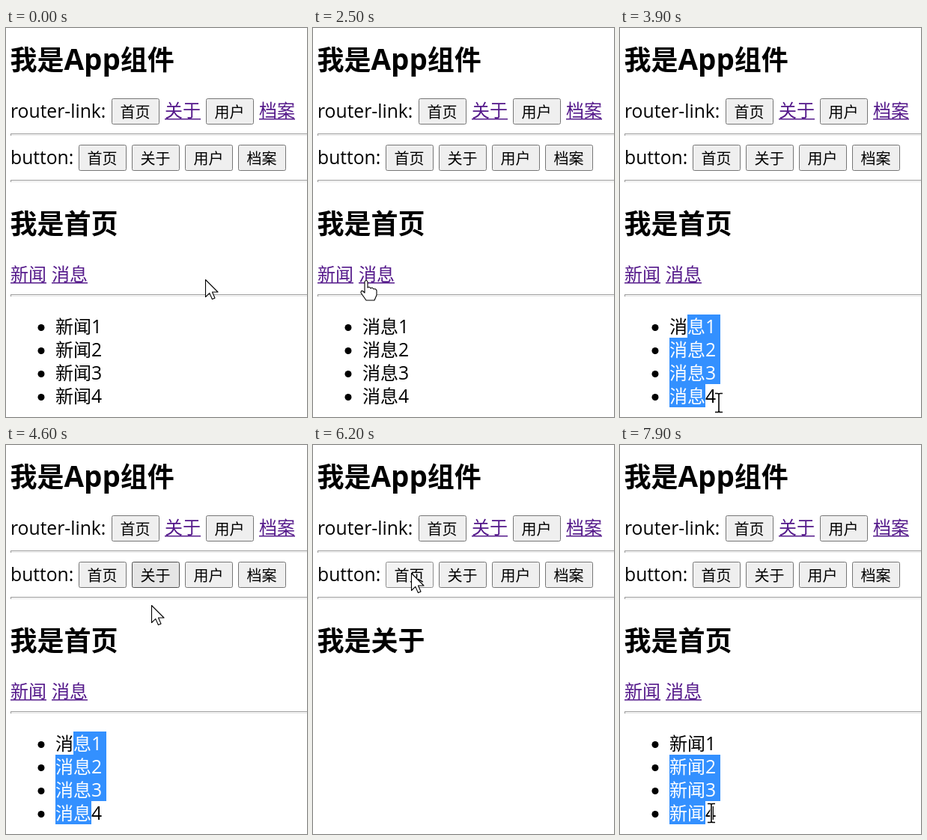
An HTML page for the animation above (8000 ms loop, 402 px wide and 520 px high).

```html
<!DOCTYPE html>
<html lang="zh-CN">
<head>
<meta charset="utf-8">
<style>
  html, body { margin: 0; width: 100%; height: 100%; overflow: hidden; background: #fff; }
  svg { display: block; width: 402px; height: 520px; }
  text { font-family: "Noto Sans CJK SC", "Noto Sans CJK", sans-serif; font-size: 24px; }
  .latin { font-family: "Open Sans", "Noto Sans", sans-serif; font-size: 24.7px; }
  .title { font-size: 36px; font-weight: 700; }
  .title .latin { font-size: 38.5px; }
  .label { font-size: 20px; text-anchor: middle; }
  .link { fill: #551a8b; }
</style>
</head>
<body>
<svg id="stage" viewBox="0 0 402 520" xmlns="http://www.w3.org/2000/svg">
  <defs><clipPath id="picked"></clipPath></defs>
</svg>
<script>
const NS = 'http://www.w3.org/2000/svg';
const LOOP = 8000, STEP = 100;
const ROWS = [0, 1, 2, 3], ROW = 31, LIST_TOP = 383;
const TEXT_LEFT = 66, DIGIT_LEFT = 114, TEXT_RIGHT = 134;
const stage = document.getElementById('stage');

function add(parent, tag, attrs = {}, text = '') {
  const el = document.createElementNS(NS, tag);
  for (const k in attrs) el.setAttribute(k, attrs[k]);
  el.textContent = text;
  parent.appendChild(el);
  return el;
}
const show = (el, on) => el.setAttribute('display', on ? 'inline' : 'none');

function rule(parent, y) {
  add(parent, 'rect', { x: 6, y: y + 2, width: 396, height: 1, fill: '#e6e6e6' });
  add(parent, 'rect', { x: 6, y, width: 396, height: 1, fill: '#9a9a9a' });
  add(parent, 'rect', { x: 6, y, width: 1, height: 3, fill: '#9a9a9a' });
}
function button(x, y, label) {
  const box = add(stage, 'rect', { x: x + .5, y: y + .5, width: 63, height: 34, rx: 2 });
  add(stage, 'text', { x: x + 31.5, y: y + 25.5, class: 'label' }, label);
  return box;
}
function link(parent, x, y, label) {
  add(parent, 'text', { x, y, class: 'link' }, label);
  add(parent, 'rect', { x, y: y + 2, width: 48, height: 1.5, class: 'link' });
}
function list(parent, word, fill) {
  const g = add(parent, 'g', { fill });
  for (const i of ROWS) {
    const y = LIST_TOP + 25 + ROW * i;
    add(g, 'text', { x: TEXT_LEFT, y }, word);
    add(g, 'text', { x: DIGIT_LEFT, y, class: 'latin' }, i + 1);
  }
  return g;
}

// Fixed part of the page
const head = add(stage, 'text', { x: 5.5, y: 55.5, class: 'title' });
add(head, 'tspan', {}, '我是');
add(head, 'tspan', { class: 'latin' }, 'App');
add(head, 'tspan', {}, '组件');
add(stage, 'text', { x: 6, y: 120, class: 'latin' }, 'router-link:');
add(stage, 'text', { x: 6, y: 182, class: 'latin' }, 'button:');
link(stage, 212, 119, '关于');
link(stage, 338, 119, '档案');
const routerButtons = [button(141, 94, '首页'), button(267, 94, '用户')];
const buttons = ['首页', '关于', '用户', '档案'].map((s, i) => button(97 + 71 * i, 156, s));
rule(stage, 141);
rule(stage, 203);
const title = add(stage, 'text', { x: 5.5, y: 274.5, class: 'title' });

// Home view
const home = add(stage, 'g');
link(home, 6, 338, '新闻');
link(home, 61, 338, '消息');
rule(home, 356);
for (const i of ROWS) add(home, 'circle', { cx: 47, cy: LIST_TOP + 17.5 + ROW * i, r: 4.5 });
const words = ['新闻', '消息'];
const plain = words.map(w => list(home, w, '#000'));
const marked = add(home, 'g', { 'clip-path': 'url(#picked)' });
add(marked, 'rect', { x: 60, y: 380, width: 90, height: 135, fill: '#3390ff' });
const white = words.map(w => list(marked, w, '#fff'));
const bands = ROWS.map(i =>
  add(document.getElementById('picked'), 'rect', { y: LIST_TOP + ROW * i, height: ROW }));

// Pointers, each with its hot spot at 0,0
const pointer = add(stage, 'g');
const line = { fill: '#fff', stroke: '#000', 'stroke-width': 1.1, 'stroke-linejoin': 'round' };
const beam = 'M-5-12.5H-2Q0-12.5 0-11Q0-12.5 2-12.5H5M0-11V11M-5 12.5H-2Q0 12.5 0 11Q0 12.5 2 12.5H5';
const shapes = {
  arrow: add(pointer, 'path', { ...line, d: 'M.5.5V23.5L5.8 18.4L9.4 26.5L13 25L9.5 17H17Z' }),
  hand: add(pointer, 'path', { ...line,
    d: 'M-2 2Q0-1 2 2V10Q4 8 6 11Q8 9 10 12Q13 11 14 14V20L11 27H0L-7 17Q-7 13-4 15L-2 17Z' }),
  beam: add(pointer, 'g')
};
add(shapes.beam, 'path', { d: beam, fill: 'none', stroke: '#fff', 'stroke-width': 3.5 });
add(shapes.beam, 'path', { d: beam, fill: 'none', stroke: '#000', 'stroke-width': 1.6 });

// The pointer rests at a spot, then eases to the next one
const spots = {
  start: [266, 336], homeButton: [118, 174], aboutButton: [203, 172], homeAgain: [131, 171],
  title: [101, 246], aboveTitle: [95, 213], messages: [71, 337],
  messageList: [99, 441], firstItem: [90, 402], lastItem: [132, 501],
  newsList: [106, 432], lastNews: [122, 492]
};
const moves = [
  { from: 200, to: 1100, spot: 'homeButton' },
  { from: 1200, to: 1300, spot: 'title' },
  { from: 1300, to: 1400, spot: 'homeButton' },
  { from: 1500, to: 1600, spot: 'aboveTitle' },
  { from: 1600, to: 2400, spot: 'messages' },
  { from: 2800, to: 3100, spot: 'messageList' },
  { from: 3100, to: 3600, spot: 'firstItem' },
  { from: 3600, to: 3900, spot: 'lastItem' },
  { from: 3900, to: 4800, spot: 'aboutButton' },
  { from: 5600, to: 5900, spot: 'homeAgain' },
  { from: 6300, to: 7000, spot: 'newsList' },
  { from: 7700, to: 7900, spot: 'lastNews' }
];
const ease = k => k * k * (3 - 2 * k);
function place(t) {
  let [x, y] = spots.start;
  for (const { from, to, spot } of moves) {
    if (t <= from) break;
    const k = ease(Math.min(1, (t - from) / (to - from)));
    x += (spots[spot][0] - x) * k;
    y += (spots[spot][1] - y) * k;
  }
  return [Math.round(x), Math.round(y)];
}

const looks = {
  rest: ['#efefef', '#767676'],
  hover: ['#e5e5e5', '#4f4f4f'],
  press: ['#f3f3f3', '#8d8d8d']
};
function paint(box, look) {
  box.setAttribute('fill', looks[look][0]);
  box.setAttribute('stroke', looks[look][1]);
}
[...routerButtons, ...buttons].forEach(b => paint(b, 'rest'));

// Text is marked from the anchor to the row under the pointer, and stays after release
const drags = [
  { from: 3700, release: 3900, until: 5100, row: 0, x: 90 },
  { from: 7900, release: 7900, until: LOOP, row: 1, x: TEXT_LEFT }
];
function select(t) {
  const drag = drags.find(d => t >= d.from && t < d.until);
  show(marked, drag);
  if (!drag) return;
  const y = place(Math.min(t, drag.release))[1];
  const last = Math.min(3, Math.floor((y - LIST_TOP) / ROW));
  bands.forEach((band, i) => {
    const left = i === drag.row ? drag.x : TEXT_LEFT;
    const right = i === last ? DIGIT_LEFT : TEXT_RIGHT;
    band.setAttribute('x', left);
    band.setAttribute('width', i < drag.row || i > last ? 0 : right - left);
  });
}

function draw(time) {
  const t = Math.floor(time % LOOP / STEP) * STEP;
  const within = (a, b) => t >= a && t < b;
  const about = within(5100, 6300);
  const news = t < 2500 || t >= 6300;

  title.textContent = about ? '我是关于' : '我是首页';
  show(home, !about);
  [plain, white].forEach(pair => {
    show(pair[0], news);
    show(pair[1], !news);
  });
  select(t);

  const homeHover = within(1000, 1300) || within(1400, 1700) || within(5900, 6400);
  paint(buttons[0], within(6100, 6300) ? 'press' : homeHover ? 'hover' : 'rest');
  paint(buttons[1], within(4600, 5800) ? 'hover' : 'rest');

  const kind = within(2400, 2900) ? 'hand' : within(3000, 4100) || t >= 6700 ? 'beam' : 'arrow';
  for (const k in shapes) show(shapes[k], k === kind);
  pointer.setAttribute('transform', `translate(${place(t)})`);
}

const start = performance.now();
function tick() {
  draw(performance.now() - start);
  requestAnimationFrame(tick);
}
tick();
</script>
</body>
</html>
```
